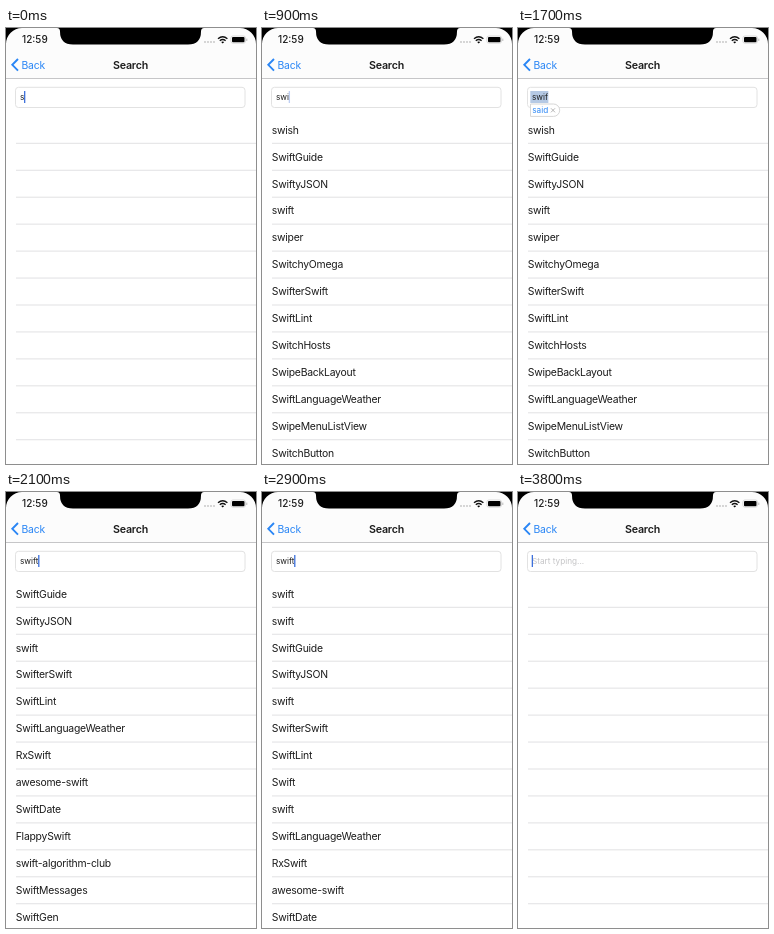
These frames come from a looping animation (250x436 px, 4000 ms). An HTML page:

```html
<!DOCTYPE html>
<html lang="en">
<head>
<meta charset="utf-8">
<title>Search</title>
<style>
  html, body { margin: 0; width: 100%; height: 100%; overflow: hidden; background: #fff; }
  svg { display: block; width: 250px; height: 436px; font: 10.4px Inter, sans-serif; letter-spacing: -.022em; }
  text { fill: #1c1c1c; }
  .blue { fill: #2a86f5; }
  .title { font-weight: 600; font-size: 10.7px; text-anchor: middle; }
  .clock { font-weight: 500; font-size: 10px; letter-spacing: 0; }
  .field { font-size: 8.2px; letter-spacing: 0; }
  .hint { fill: #c4c4c6; }
</style>
</head>
<body>
<svg viewBox="0 0 250 436">
  <rect width="250" height="50" fill="#fcfcfc"/>
  <path d="M0 50.5H250" stroke="#c6c6c8"/>
  <path d="M0 0H16A16 16 0 0 0 0 16ZM250 0H234A16 16 0 0 1 250 16Z
    M51 0Q54 0 54 3.500Q54 16.500 67 16.500H182Q195 16.500 195 3.500Q195 0 198 0Z"/>

  <text class="clock" x="16" y="15.200">12:59</text>
  <g fill="#c4c4c4">
    <circle cx="199" cy="14" r=".9"/><circle cx="202" cy="14" r=".9"/>
    <circle cx="205" cy="14" r=".9"/><circle cx="208" cy="14" r=".9"/>
  </g>
  <path d="M212 10.800Q216.700 6.800 221.400 10.800M213.800 12.700Q216.700 10.300 219.600 12.700"
    fill="none" stroke="#111" stroke-width="1.400"/>
  <path d="M215.200 14L216.700 15.500L218.200 14Q216.700 12.800 215.200 14Z"/>
  <rect x="224.900" y="8" width="14.600" height="7.200" rx="2" fill="none" stroke="#ccc" stroke-width=".7"/>
  <rect x="226" y="9" width="12.500" height="5.200" rx="1"/>
  <path d="M240.800 10.600V13" stroke="#bbb"/>

  <path d="M12 31L6.300 36.800L12 42.600" fill="none" stroke="#2a86f5" stroke-width="1.900"/>
  <text class="blue" x="15.500" y="40.600">Back</text>
  <text class="title" x="124.500" y="40.600">Search</text>

  <path id="lines" stroke="#e1e1e3"/>
  <g id="rows"></g>

  <rect x="9.500" y="59.300" width="229.500" height="20.200" rx="3" fill="#fff" stroke="#e2e2e2"/>
  <rect id="selection" x="12.300" y="63" height="12" fill="#b5c9e4"/>
  <text id="hint" class="field hint" x="14" y="72">Start typing...</text>
  <text id="query" class="field" x="14" y="72"></text>
  <rect id="caret" y="63" width="1.300" height="12" fill="#3d70dc"/>
  <g id="popup">
    <path d="M12.500 76H35.500A6.200 6.200 0 0 1 35.500 88.400H12.500Z" fill="#fff" stroke="#d6d6d6"/>
    <text class="field blue" x="14.300" y="85.200">said</text>
    <path d="M33 80.300L37 84.300M37 80.300L33 84.300" stroke="#b5b5b5"/>
  </g>
</svg>
<script>
const $ = id => document.getElementById(id);
const LOOP = 4000, STEP = 100, ROW = 26.95;

const forSwi = `swish SwiftGuide SwiftyJSON swift swiper SwitchyOmega SwifterSwift SwiftLint
  SwitchHosts SwipeBackLayout SwiftLanguageWeather SwipeMenuListView SwitchButton`;
const forSwif = `SwiftGuide SwiftyJSON swift SwifterSwift SwiftLint SwiftLanguageWeather RxSwift
  awesome-swift SwiftDate FlappySwift swift-algorithm-club SwiftMessages SwiftGen`;
const forSwift = `swift swift SwiftGuide SwiftyJSON swift SwifterSwift SwiftLint Swift swift
  SwiftLanguageWeather RxSwift awesome-swift SwiftDate`;

// Each entry: [start time, value]
const queries = [[0, 's'], [100, 'sw'], [200, 'swi'], [1300, 'swif'], [2000, 'swift'],
  [3600, 'swi'], [3700, 's'], [3800, '']];
const results = [[0, ''], [900, forSwi], [1800, forSwif], [2700, forSwift], [3800, '']];
const blink = [[0, 1], [400, 1], [700, 0], [800, 0], [1100, 1], [2300, 1], [2500, 0],
  [2600, 0], [2900, 1], [3100, 0], [3200, 0], [3400, 1], [LOOP, 1]];

const valueAt = (track, t) => track.findLast(([start]) => start <= t)[1];

function fadeAt(t) {
  const next = blink.findIndex(([time]) => time > t);
  const [t0, v0] = blink[next - 1], [t1, v1] = blink[next];
  return v0 + (v1 - v0) * (t - t0) / (t1 - t0);
}

const show = (el, visible) => el.setAttribute('visibility', visible ? 'visible' : 'hidden');

$('lines').setAttribute('d', Array.from({ length: 12 }, (_, i) => `M10 ${115.3 + i * ROW}H250`).join(''));

let shown;
function showResults(list) {
  if (list === shown) return;
  shown = list;
  $('rows').innerHTML = list.split(/\s+/)
    .map((name, i) => `<text x="9.700" y="${105.6 + i * ROW}">${name}</text>`).join('');
}

function draw(now) {
  const t = Math.floor(now % LOOP / STEP) * STEP;
  const query = valueAt(queries, t);
  const correcting = t >= 1600 && t < 2000;
  $('query').textContent = query;
  const width = query ? $('query').getComputedTextLength() : 0;
  $('caret').setAttribute('x', 13.7 + width);
  $('caret').setAttribute('opacity', fadeAt(t));
  $('selection').setAttribute('width', width + 2);
  show($('hint'), !query);
  show($('caret'), !correcting);
  show($('selection'), correcting);
  show($('popup'), correcting);
  showResults(valueAt(results, t));
}

const start = performance.now();
function tick() {
  draw(performance.now() - start);
  requestAnimationFrame(tick);
}
tick();
</script>
</body>
</html>
```
